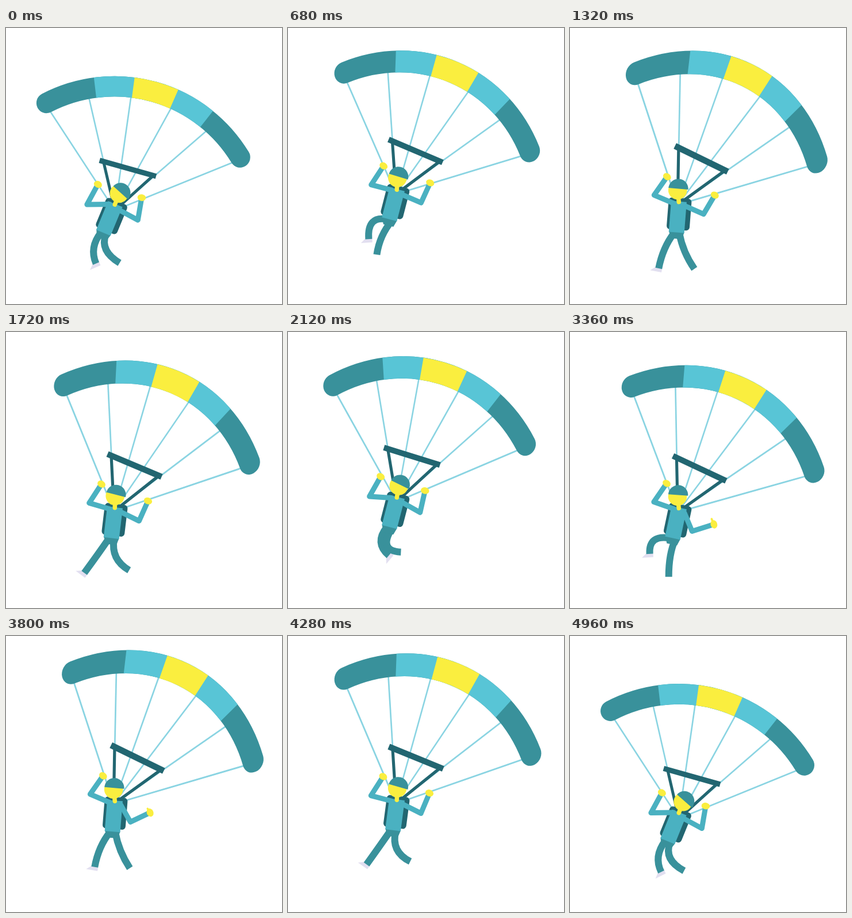
Write an HTML page with a canvas that moves like this. It is 480x480 px and loops after 5000 ms.

```html
<!DOCTYPE html>
<html lang="en">
<head>
<meta charset="utf-8">
<title>Paraglider</title>
<style>
  html, body { margin: 0; width: 100%; height: 100%; overflow: hidden; background: #fff; }
  canvas { display: block; width: 100vmin; height: 100vmin; }
</style>
</head>
<body>
<canvas id="stage" width="480" height="480"></canvas>
<script>
const ctx = document.getElementById('stage').getContext('2d');
const TEAL = '#39919b', CYAN = '#58c5d6', YELLOW = '#faee3f', STRING = '#8ad4e2';
const DARK = '#226671', SUIT = '#4ab1c1', SHOE = '#e2dff0';
const LOOP = 5000, SWING = 2500, RAD = Math.PI / 180;

// time, canopy angle, canopy stretch, body lean, head tilt,
// then knee x,y and foot x,y of the left and right leg, from the waist
const POSES = [
  [0,    15.7, 1.018, 22.5, 42, -25, 26, -13, 54,  -7, 32,  28, 53],
  [340,  17.5, 1.045, 20,   34, -35, 12, -27, 47, -15, 32,   4, 60],
  [680,  23,   1.1,   14.5, 17, -39, -6, -36, 35, -17, 28, -22, 62],
  [860,  25.1, 1.133, 12,    4, -42, -6, -40, 28,  -7, 28,  -7, 68],
  [1320, 26,   1.2,    4.5,  5, -24, 27, -31, 63,  11, 35,  31, 64],
  [1780, 22.2, 1.157,  7.5, 16, -23, 28, -46, 60,  -4, 38,  30, 55],
  [2120, 17.2, 1.112, 14.5, 26, -27, 28,  -1, 50, -20, 42,  20, 44]
];

const mix = (a, b, k) => a + (b - a) * k;
const smooth = (from, to, t) => {
  const k = Math.min(1, Math.max(0, (t - from) / (to - from)));
  return k * k * (3 - 2 * k);
};
const turn = (x, y, deg) => {
  const c = Math.cos(deg * RAD), s = Math.sin(deg * RAD);
  return [x * c - y * s, x * s + y * c];
};

// Smooth periodic curve through the poses.
function poseAt(t) {
  const n = POSES.length;
  const key = i => POSES[(i + n) % n];
  const time = i => key(i)[0] + Math.floor(i / n) * SWING;
  let i = n - 1;
  while (POSES[i][0] > t) i--;
  const span = time(i + 1) - time(i), u = (t - time(i)) / span;
  return key(i).map((_, j) => {
    const slope = q => (key(q + 1)[j] - key(q - 1)[j]) / (time(q + 1) - time(q - 1)) * span;
    const a = key(i)[j], b = key(i + 1)[j];
    return mix(a, b, u * u * (3 - 2 * u)) +
      u * (1 - u) * ((1 - u) * slope(i) - u * slope(i + 1));
  }).slice(1);
}

function line(color, width, points, cap = 'butt') {
  ctx.strokeStyle = color;
  ctx.lineWidth = width;
  ctx.lineCap = cap;
  ctx.lineJoin = 'round';
  ctx.beginPath();
  points.forEach(p => ctx.lineTo(...p));
  ctx.stroke();
}

function poly(color, points) {
  ctx.fillStyle = color;
  ctx.beginPath();
  points.forEach(p => ctx.lineTo(...p));
  ctx.fill();
}

function ellipse(color, x, y, rx, ry = rx, from = 0, to = 2 * Math.PI) {
  ctx.fillStyle = color;
  ctx.beginPath();
  ctx.ellipse(x, y, rx, ry, 0, from, to);
  ctx.fill();
}

function placed(x, y, deg, draw, stretch = 1) {
  ctx.save();
  ctx.translate(x, y);
  ctx.rotate(deg * RAD);
  ctx.scale(1, stretch);
  draw();
  ctx.restore();
}

function canopy() {
  const cx = 10, cy = 46, radius = 259;
  for (const deg of [-42.7, -25.9, -8.6, 8.6, 25.9, 42.7]) {
    const [x, y] = turn(0, -245, deg);
    line(STRING, 2.6, [[0, 0], [cx + x, cy + y]]);
  }
  const arc = (color, from, to, cap) => {
    ctx.strokeStyle = color;
    ctx.lineWidth = 35;
    ctx.lineCap = cap;
    ctx.beginPath();
    ctx.arc(cx, cy, radius, (from - 90) * RAD, (to - 90) * RAD);
    ctx.stroke();
  };
  arc(TEAL, -42.5, 42.5, 'round');
  arc(CYAN, -22.9, 22.9, 'butt');
  arc(YELLOW, -8.2, 8.2, 'butt');
  line(DARK, 5, [[-42, -75], [0, 0], [48, -75]]);
  line(DARK, 9, [[-49, -75], [53, -75]]);
}

function leg(start, knee, foot) {
  ctx.strokeStyle = TEAL;
  ctx.lineWidth = 12;
  ctx.lineCap = 'butt';
  ctx.beginPath();
  ctx.moveTo(...start);
  ctx.quadraticCurveTo(...knee, ...foot);
  ctx.stroke();
}

function arm(shoulder, elbow, hand, thumb) {
  line(SUIT, 9, [shoulder, elbow, hand], 'round');
  const angle = Math.atan2(hand[1] - elbow[1], hand[0] - elbow[0]) / RAD;
  placed(...hand, angle, () => {
    if (thumb > 0) line(YELLOW, 3.6, [[0, 0], [-1, -10 * thumb]], 'round');
    ellipse(YELLOW, 0, 0, 5.8, 7.3);
  });
}

function render(t) {
  const [angle, stretch, lean, tilt, ...legs] = poseAt(t % SWING);
  const nx = 189.3;
  const ny = 295.5 + 13.5 * Math.cos((t + 100) / LOOP * 6 * Math.PI);
  const k = (angle - 15.6) / 10.4;
  const thumb = smooth(2900, 3200, t) - smooth(3700, 4050, t);
  const at = (x, y) => [nx + x, ny + y];
  const onBody = (x, y) => at(...turn(x, y, lean));

  ctx.fillStyle = '#fff';
  ctx.fillRect(0, 0, 480, 480);

  placed(nx - 2.1 * k, ny + 9 - 28 * (stretch - 1.018), angle, canopy, stretch);

  // Legs, with a shoe on the left one
  const [wx, wy] = onBody(0, 51.5);
  const joint = i => [wx + legs[i], wy + legs[i + 1]];
  const knee = joint(0), foot = joint(2);
  const heading = Math.atan2(foot[1] - knee[1], foot[0] - knee[0]) / RAD - 90;
  placed(...foot, heading, () => poly(SHOE, [[-6, -1], [6, -1], [6, 6], [-14, 6]]));
  leg(onBody(-4, 53), knee, foot);
  leg(onBody(5, 53), joint(4), joint(6));

  // Backpack, hips and torso
  placed(nx, ny, lean, () => {
    ctx.fillStyle = DARK;
    ctx.beginPath();
    ctx.roundRect(-18, -8, 40, 55.5, 6);
    ctx.fill();
    poly(TEAL, [[-13.5, 51], [13.5, 51], [10, 63], [-8, 63]]);
    poly(SUIT, [[-13.5, -2], [13.5, -2], [13.5, 52], [-13.5, 52]]);
  });

  arm(onBody(-9, 2),
    at(mix(-48.5, -43, k), mix(-1, -13, k)),
    at(mix(-29.5, -20.5, k), mix(-36, -45, k)), 0);
  arm(onBody(11, 5),
    at(mix(mix(40, 43, k), 23, thumb), mix(mix(26, 20, k), 39, thumb)),
    at(mix(mix(46.5, 62.5, k), 61, thumb), mix(-13, 27, thumb)), thumb);

  // Head
  const head = at(...turn(0, -21.7, 0.7 * tilt - 9));
  line(YELLOW, 7.5, [[nx, ny - 1], head], 'round');
  placed(...head, tilt, () => {
    ellipse(YELLOW, 0, 0, 16.3);
    ellipse(TEAL, 1, -2.5, 17.2, 17.2, Math.PI, 2 * Math.PI);
  });
}

function tick() {
  render(performance.now() % LOOP);
  requestAnimationFrame(tick);
}
tick();
</script>
</body>
</html>
```
